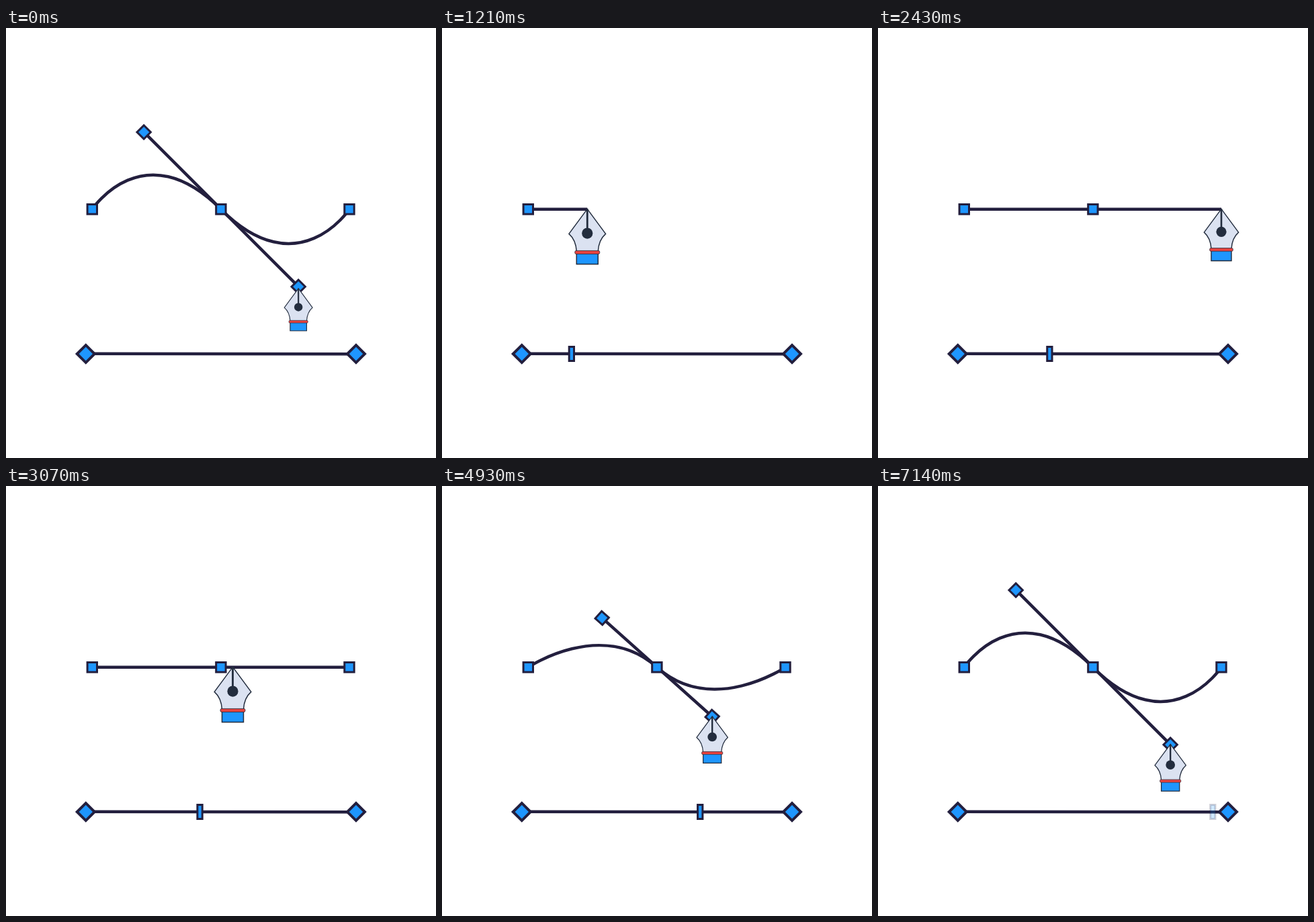
An HTML page with a canvas for the animation above (7210 ms loop, 640 by 640 pixels).

```html
<!DOCTYPE html>
<html lang="en">
<head>
<meta charset="utf-8">
<title>Pen tool</title>
<style>
  html, body { margin: 0; height: 100%; overflow: hidden; background: #fff; }
  canvas { display: block; width: 640px; height: 640px; }
</style>
</head>
<body>
<canvas width="640" height="640"></canvas>
<script>
const ctx = document.querySelector('canvas').getContext('2d');
const LOOP = 7210, FRAMES = 101, STEP = LOOP / FRAMES;
const INK = '#231f3e', BLUE = '#1e96ff', PEN_INK = '#232d3e';
const LEFT = 128.3, MID = 319.9, RIGHT = 511, BASE = 269.8;
const PRESSED = 0.847;

const ramp = (t, start, end) => Math.min(1, Math.max(0, (t - start) / (end - start)));
const ease = (t, start, end) => {
  const p = ramp(t, start, end);
  return p * p * (3 - 2 * p);
};
const mix = (a, b, p) => a + (b - a) * p;

function box(x, y, w, h, border, angle = 0, scale = 1) {
  if (scale <= 0) return;
  ctx.save();
  ctx.translate(x, y);
  ctx.rotate(angle);
  ctx.scale(scale, scale);
  ctx.beginPath();
  ctx.rect(-w / 2, -h / 2, w, h);
  ctx.fillStyle = BLUE;
  ctx.fill();
  ctx.strokeStyle = INK;
  ctx.lineWidth = border;
  ctx.stroke();
  ctx.restore();
}

const node = (x, y, scale, angle) => box(x, y, 14.4, 14.4, 3, angle, scale);

function stroke(build) {
  ctx.beginPath();
  build();
  ctx.strokeStyle = INK;
  ctx.lineWidth = 4.5;
  ctx.stroke();
}

function line(x1, y1, x2, y2) {
  stroke(() => { ctx.moveTo(x1, y1); ctx.lineTo(x2, y2); });
}

// Draws the nib with its tip at the given point; shrink acts around its middle.
function pen(x, y, scale, shrink) {
  if (shrink <= 0) return;
  ctx.save();
  ctx.translate(x, y);
  ctx.scale(scale, scale);
  ctx.translate(0, 41);
  ctx.scale(shrink, shrink);
  ctx.translate(0, -41);
  ctx.strokeStyle = PEN_INK;
  ctx.lineWidth = 1.5;

  ctx.beginPath();
  ctx.moveTo(0, 0);
  ctx.lineTo(27.3, 37);
  ctx.quadraticCurveTo(17, 46, 16, 63);
  ctx.lineTo(-16, 63);
  ctx.quadraticCurveTo(-17, 46, -27.3, 37);
  ctx.closePath();
  ctx.fillStyle = '#dbe2f1';
  ctx.fill();
  ctx.stroke();

  ctx.beginPath();
  ctx.rect(-16, 65, 32, 17.2);
  ctx.fillStyle = BLUE;
  ctx.fill();
  ctx.stroke();

  ctx.beginPath();
  ctx.roundRect(-18.5, 62, 37, 5, 2);
  ctx.fillStyle = '#e8433f';
  ctx.fill();
  ctx.lineWidth = 0.8;
  ctx.stroke();

  ctx.beginPath();
  ctx.moveTo(0, 0);
  ctx.lineTo(0, 36);
  ctx.lineWidth = 2.8;
  ctx.stroke();
  ctx.beginPath();
  ctx.arc(0, 36.2, 8.1, 0, 7);
  ctx.fillStyle = PEN_INK;
  ctx.fill();
  ctx.restore();
}

// Offset of the right handle from the middle node; the left one mirrors it.
function handleOffset(t) {
  const pull = 33 * ease(t, 5190, 5790);
  return [82 * ease(t, 3340, 3800) + pull, 82 * ease(t, 4446, 5046) + pull];
}

function drawing(t) {
  const [dx, dy] = handleOffset(t);
  const penTo = (a, b, start) => mix(a, b, ease(t, start, start + 600));
  if (t < 3340) {
    if (t > 930) line(LEFT, BASE, penTo(LEFT, MID, 930), BASE);
    if (t > 1750) line(MID, BASE, penTo(MID, RIGHT, 1750), BASE);
  } else {
    stroke(() => {
      ctx.moveTo(LEFT, BASE);
      ctx.bezierCurveTo(LEFT, BASE, MID - dx, BASE - dy, MID, BASE);
      ctx.bezierCurveTo(MID + dx, BASE + dy, RIGHT, BASE, RIGHT, BASE);
    });
    line(MID + 0.3 - dx, BASE - dy, MID + 0.3 + dx, BASE + dy);
    const angle = Math.atan2(dy, dx), size = ease(t, 3340, 3490);
    const lift = 0.8 * (1 - ease(t, 4446, 5046));
    for (const side of [-1, 1]) {
      node(MID + 0.3 + side * dx, BASE + 0.2 + side * dy - lift, size, angle);
    }
  }
  node(LEFT, BASE, ease(t, 890, 1030));
  node(MID, BASE, ease(t, 1680, 1830));
  node(RIGHT, BASE, ease(t, 2510, 2660));
}

const click = (t, start, end) => {
  const middle = (start + end) / 2;
  return ease(t, start, middle) - ease(t, middle, end);
};

function penPose(t) {
  const [dx, dy] = handleOffset(t);
  let x = LEFT - 0.3;
  x += (MID + 0.4 - x) * ease(t, 930, 1530);
  x += (RIGHT - x) * ease(t, 1750, 2350);
  x += (MID + 0.3 - x) * ease(t, 2581, 3181);
  x += 82 * ease(t, 3479, 4079);
  if (t > 4100) x = MID + 0.3 + dx;
  const press = click(t, 775, 1030) + click(t, 1530, 1830) + click(t, 2362, 2662)
    + click(t, 3190, 3490) + ease(t, 4100, 4280);
  return [x, BASE - 0.4 + (t > 4100 ? dy : 0), 1 - (1 - PRESSED) * press];
}

function render(t) {
  ctx.globalAlpha = 1;
  ctx.fillStyle = '#fff';
  ctx.fillRect(0, 0, 640, 640);

  line(119, 484.7, 521, 485.3);
  ctx.globalAlpha = ramp(t, 0, 280) * (1 - ramp(t, 6920, 7195));
  box(130.3 + 3.68 * t / STEP, 485, 7.3, 21, 3);
  ctx.globalAlpha = 1;
  for (const x of [118.8, 521]) box(x, 485, 18.4, 18.4, 4, Math.PI / 4);

  // The finished drawing leaves at the beginning of the next loop.
  const leaving = t < 290;
  ctx.globalAlpha = leaving ? 1 - ease(t, 10, 280) : 1;
  drawing(leaving ? LOOP : t);
  ctx.globalAlpha = 1;
  const shrink = leaving ? 1 - ease(t, -57, 243) : ease(t, 290, 550);
  pen(...penPose(leaving ? LOOP : t), shrink);
}

function tick() {
  const t = performance.now() % LOOP;
  render(Math.min(FRAMES - 1, Math.floor((t + 6) / STEP)) * STEP);
  requestAnimationFrame(tick);
}
tick();
</script>
</body>
</html>
```
